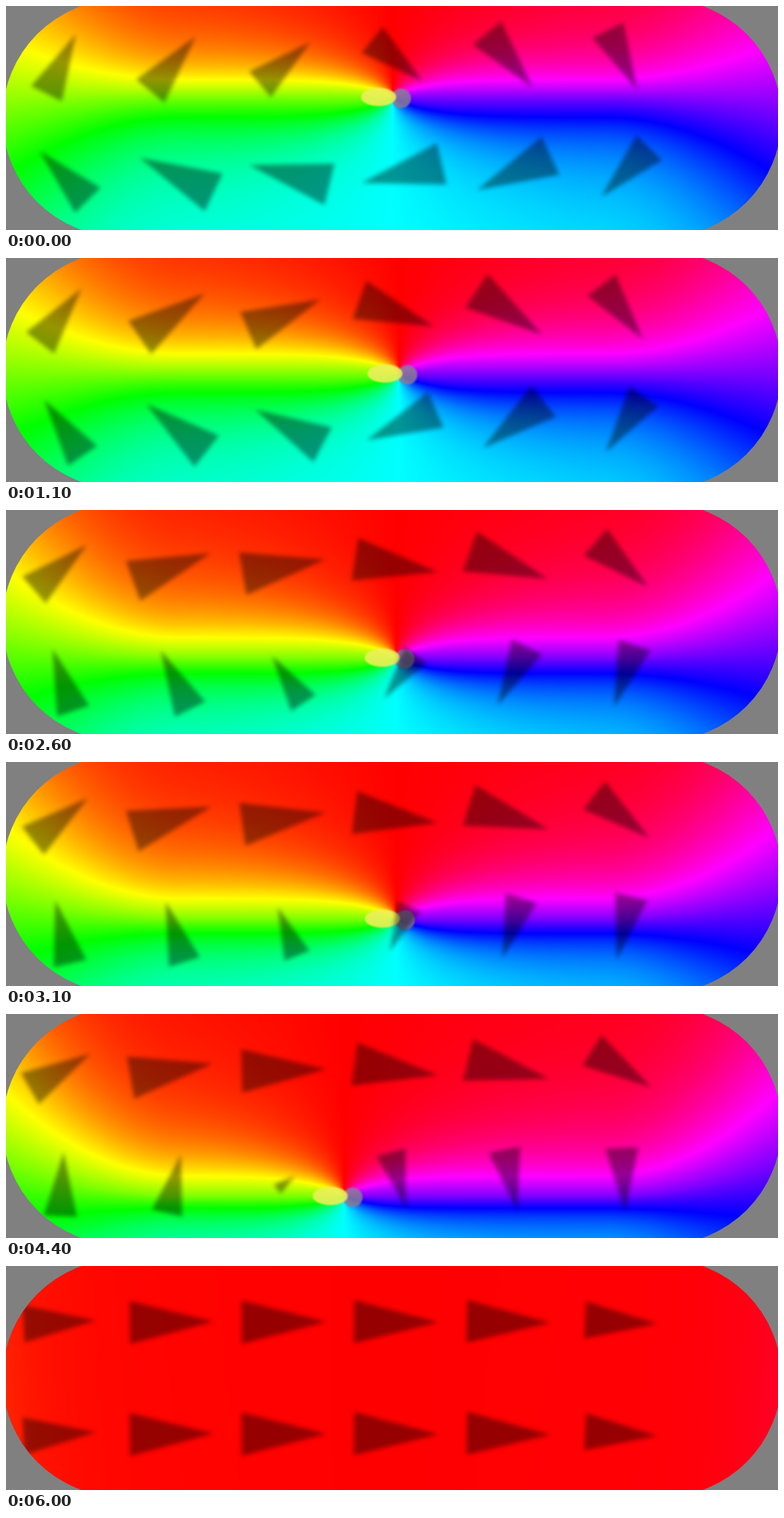
Recreate the animation shown at these times as an HTML page with a canvas. Size 1100 by 320 pixels, loop 6.1 s.

```html
<!DOCTYPE html>
<html>
<head>
<meta charset="utf-8">
<style>
html, body { margin: 0; height: 100%; overflow: hidden; background: #808080; }
canvas { display: block; }
</style>
</head>
<body>
<canvas id="stage" width="1100" height="320"></canvas>
<script>
const W = 1100, H = 320, STEP = 2, LOOP = 6100;
const COLS = 6, ROWS = 2, PITCH = 160, RADIUS = 170;
const ctx = document.getElementById('stage').getContext('2d');
const map = document.createElement('canvas');
map.width = W / STEP;
map.height = H / STEP;
const mapCtx = map.getContext('2d');
const pixels = mapCtx.createImageData(map.width, map.height);

// Vortex core path: seconds, x, y
const path = [
  [0, 551, 130], [1.1, 560, 165], [1.9, 559, 189], [2.6, 556, 211],
  [3.7, 557, 239], [4.4, 482, 260], [5, 465, 310], [5.5, 460, 500], [6, 500, 2000]
];

const clamp = v => Math.max(0, Math.min(1, v));

function coreAt(t) {
  let i = 1;
  while (i < path.length - 1 && t > path[i][0]) i++;
  const [t0, x0, y0] = path[i - 1], [t1, x1, y1] = path[i];
  const k = clamp((t - t0) / (t1 - t0));
  return { x: x0 + (x1 - x0) * k, y: y0 + (y1 - y0) * k };
}

// Unit magnetisation (y upwards): a wall through the core,
// widening at both ends and squeezed where it nears an edge
function field(x, y, core) {
  const q = Math.max(0, 1 - Math.min(x, W - x) / 250) ** 2;
  const d = y - core.y - (160 - core.y) * 0.5 * q;
  const dx = core.x - x;
  const room = d < 0 ? core.y : H - core.y;
  const width = 20 + 0.18 * Math.max(0, Math.min(room, 170)) + 120 * q;
  const reach = 35 + 1.8 * Math.min(Math.abs(d), 240);
  const up = width * Math.tanh(dx / reach);
  const n = Math.hypot(d, up) || 1;
  return [-d / n, up / n];
}

function inside(x, y) {
  const dx = Math.max(165 - x, x - 935, 0);
  return dx === 0 || Math.hypot(dx, y - 160) < RADIUS;
}

// Paints the hue map and returns the mean vector of each cell
function paintField(core) {
  const means = Array.from({ length: COLS * ROWS }, () => [0, 0]);
  const share = COLS * ROWS * STEP * STEP / (W * H);
  const data = pixels.data;
  let p = 0;
  for (let y = STEP / 2; y < H; y += STEP) {
    for (let x = STEP / 2; x < W; x += STEP) {
      const [mx, my] = field(x, y, core);
      const h = (Math.atan2(my, mx) * 3 / Math.PI + 6) % 6;
      data[p++] = 255 * clamp(Math.abs(h - 3) - 1);
      data[p++] = 255 * clamp(2 - Math.abs(h - 2));
      data[p++] = 255 * clamp(2 - Math.abs(h - 4));
      data[p++] = 255;
      if (inside(x, y)) {
        const cell = Math.floor(x * COLS / W) + COLS * Math.floor(y * ROWS / H);
        means[cell][0] += mx * share;
        means[cell][1] += my * share;
      }
    }
  }
  mapCtx.putImageData(pixels, 0, 0);
  ctx.drawImage(map, 0, 0, W, H);
  return means;
}

function ellipse(x, y, rx, ry, color) {
  ctx.fillStyle = color;
  ctx.beginPath();
  ctx.ellipse(x, y, rx, ry, 0, 0, 2 * Math.PI);
  ctx.fill();
}

function arrow(x, y, mx, my) {
  const size = Math.hypot(mx, my);
  ctx.save();
  ctx.translate(x, y);
  ctx.rotate(Math.atan2(-my, mx));
  ctx.scale(size, size);
  ctx.beginPath();
  ctx.moveTo(-64, -31);
  ctx.lineTo(56, 0);
  ctx.lineTo(-64, 31);
  ctx.fill();
  ctx.restore();
}

function draw(t) {
  const core = coreAt(t);
  ctx.fillStyle = '#808080';
  ctx.fillRect(0, 0, W, H);
  ctx.save();
  ctx.beginPath();
  ctx.roundRect(165 - RADIUS, 160 - RADIUS, 770 + 2 * RADIUS, 2 * RADIUS, RADIUS);
  ctx.clip();
  const means = paintField(core);
  ctx.filter = 'blur(1px)';
  ellipse(core.x + 12, core.y + 2, 14, 14, 'rgba(135,125,150,.85)');
  ellipse(core.x - 20, core.y, 25, 13, 'rgba(235,240,90,.9)');
  ctx.filter = 'blur(3px)';
  ctx.fillStyle = 'rgba(0,0,0,.41)';
  means.forEach(([mx, my], i) =>
    arrow(80 + PITCH * (i % COLS), 80 + PITCH * Math.floor(i / COLS), mx, my));
  ctx.restore();
}

let last = -1;
const start = performance.now();
function tick() {
  const frame = Math.floor(((performance.now() - start) % LOOP) / 100);
  if (frame !== last) draw(frame / 10);
  last = frame;
  requestAnimationFrame(tick);
}
tick();
</script>
</body>
</html>
```
